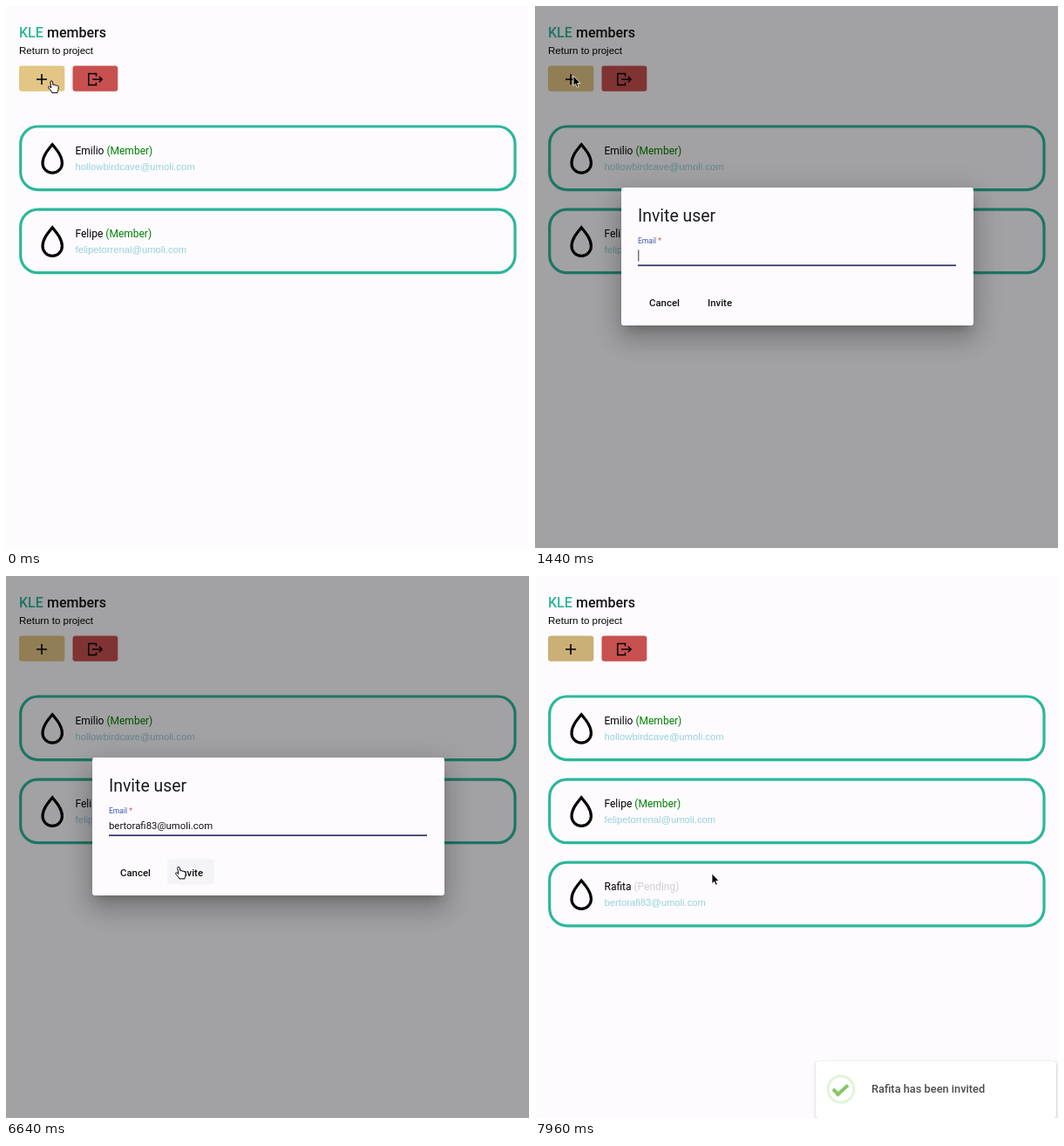
An HTML page for the animation above (8 s loop, 600 px wide and 621 px high).

```html
<!DOCTYPE html>
<html lang="en">
<head>
<meta charset="utf-8">
<title>Members</title>
<style>
  html, body { margin: 0; width: 100%; height: 100%; overflow: hidden; background: #fdfbfe; }
  #stage { position: relative; width: 600px; height: 621px; overflow: hidden; background: #fdfbfe; }
  #stage > * { position: absolute; left: 0; top: 0; }
  svg { display: block; overflow: visible; }
  text { font-family: Roboto, sans-serif; white-space: pre; }
  .mail, .back { font-family: "Liberation Sans", Arial, sans-serif; }
  .mail { font-size: 11.25px; fill: #97d1dd; }
  .line { fill: none; stroke: #000; }
  .action { font-size: 11.4px; font-weight: 500; fill: #111; }
  #shade { width: 600px; height: 621px; background: #000; }
  #stage > #dialog {
    left: 99px; top: 207.5px; width: 403.5px; height: 158.5px; border-radius: 3px; background: #fdfbfe;
    box-shadow: 0 8px 11px -5px rgba(0,0,0,.2), 0 17px 27px 2px rgba(0,0,0,.14), 0 6px 33px 6px rgba(0,0,0,.12);
  }
  #stage > #toast {
    left: 322px; top: 556px; width: 276px; height: 64.5px; border-radius: 3px; background: #fff;
    box-shadow: 0 0 1px rgba(0,0,0,.2), 0 1px 2px rgba(0,0,0,.1), 1px 2px 4px rgba(0,0,0,.075), 1px 3px 8px rgba(0,0,0,.075);
  }
</style>
</head>
<body>
<div id="stage">
  <svg width="600" height="621">
    <text y="35.5" font-size="16" font-weight="500"><tspan x="15" fill="#2db59a">KLE</tspan><tspan x="47" fill="#111">members</tspan></text>
    <text class="back" x="15" y="55" font-size="11.5">Return to project</text>
    <rect id="add" x="15" y="68.5" width="52.3" height="29.2" rx="3"/>
    <path class="line" stroke-width="1.6" d="M35 84h12M41 78v12"/>
    <rect x="76.5" y="68.5" width="51.8" height="29.2" rx="3" fill="#c8504f"/>
    <path class="line" stroke-width="1.5" d="M103.5 80.5v-3h-8.700v13h8.700v-3M99 84h11M106.800 80.700l3.300 3.300l-3.300 3.300"/>
    <g id="cards"></g>
  </svg>
  <div id="shade"></div>
  <div id="dialog">
    <svg width="403.5" height="158.5" viewBox="99 207.5 403.5 158.5">
      <text x="118" y="246" font-size="19.4" fill="#1b1b1f">Invite user</text>
      <text id="label" font-size="11.4">Email <tspan fill="#f44336">*</tspan></text>
      <text id="input" x="118" y="289" font-size="11.35" fill="#111"></text>
      <rect id="caret" y="279" width="1" height="13" fill="#333"/>
      <rect x="118" y="296" width="365" height="1" fill="#858488"/>
      <rect id="ripple" y="296" height="1.6" fill="#30336f"/>
      <rect id="hover" x="185" y="324" width="54" height="29" rx="3" fill="#f4f4f6"/>
      <text class="action" x="131" y="343">Cancel</text>
      <text class="action" x="198" y="343">Invite</text>
    </svg>
  </div>
  <div id="toast">
    <svg width="276" height="64.5" viewBox="322 556 276 64.5">
      <circle cx="351" cy="588" r="15" fill="none" stroke="#e1f4d8" stroke-width="3"/>
      <g fill="none" stroke="#86c867" stroke-width="4">
        <path id="tip" pathLength="1" d="M342 588l7 7"/>
        <path id="long" pathLength="1" d="M346 595.200L359 583.500"/>
      </g>
      <text x="386" y="592" font-size="12.8" font-weight="500" fill="#4b4b4b">Rafita has been invited</text>
    </svg>
  </div>
  <svg width="600" height="621">
    <g id="cursor">
      <path id="arrow" fill="#000" stroke="#fff" stroke-width=".8" d="M0 0V11.500L2.600 9.200L4.400 13.200L6.300 12.400L4.600 8.600L8 8.400Z"/>
      <path id="hand" fill="#fff" stroke="#000" stroke-width="1" stroke-linejoin="round" d="M-1.200 1C-1.200-.6 1.200-.6 1.400 1L2 4.600C2.500 3.600 4 3.800 4.200 5C4.800 4.200 6.200 4.500 6.300 5.600C7 5 8.200 5.400 8.200 6.600L8 9.500C7.800 11 7 11.600 7 13.400H.8C.6 11.800-1.600 10-3.300 7.600C-3.900 6.400-2.400 5.800-1.500 6.700L-.2 8Z"/>
    </g>
  </svg>
</div>
<script>
const LOOP = 8000;
const OPEN = 270, FOCUS = 420, CLOSE = 6680, TOAST = 7160, LISTED = 7240;
const EMAIL = 'bertorafi83@umoli.com';
const KEYS = [1880, 2080, 2320, 2400, 2480, 2680, 2840, 2960, 3160, 3400, 3480,
  3920, 4520, 4680, 4920, 5040, 5240, 5480, 5640, 5800, 5960];
// time, x, y of the pointer
const POINTER = [[0, 52, 86], [40, 52, 86], [480, 44, 80], [6240, 44, 80], [6560, 198, 333.5],
  [6680, 198, 333.5], [7000, 202, 335], [7120, 202, 335], [7880, 203, 341]];
// share of time, vertical shift, angle of the toast wobble
const WOBBLE = [[0, -7, 2], [.33, 0, -2], [.66, 3.5, 2], [1, 0, 0]];
const MEMBERS = [
  ['Emilio', '(Member)', 'green', 'hollowbirdcave@umoli.com'],
  ['Felipe', '(Member)', 'green', 'felipetorrenal@umoli.com'],
  ['Rafita', '(Pending)', '#cfcfd1', EMAIL]
];

const $ = id => document.getElementById(id);
const set = (id, attrs) => Object.entries(attrs).forEach(([k, v]) => $(id).setAttribute(k, v));
const show = (id, on) => { $(id).style.display = on ? '' : 'none'; };
const clamp = p => Math.max(0, Math.min(1, p));
const span = (t, start, length) => clamp((t - start) / length);
const mix = (a, b, p) => a + (b - a) * p;

function bezier(x1, y1, x2, y2) {
  const at = (a, b, s) => 3 * (1 - s) ** 2 * s * a + 3 * (1 - s) * s * s * b + s ** 3;
  return p => {
    let lo = 0, hi = 1;
    for (let i = 0; i < 20; i++) {
      const mid = (lo + hi) / 2;
      if (at(x1, x2, mid) < p) lo = mid; else hi = mid;
    }
    return at(y1, y2, hi);
  };
}
const swift = bezier(.25, .8, .25, 1);
const enter = bezier(0, 0, .2, 1);
const smooth = bezier(.42, 0, .58, 1);

function track(keys, t) {
  const i = keys.findIndex(k => k[0] > t);
  if (i < 0) return keys[keys.length - 1].slice(1);
  const a = keys[i - 1], b = keys[i];
  const p = smooth((t - a[0]) / (b[0] - a[0]));
  return a.slice(1).map((v, n) => mix(v, b[n + 1], p));
}

$('cards').innerHTML = MEMBERS.map(([name, role, color, mail], i) => `
  <g id="card${i}" transform="translate(0 ${i * 95.1})">
    <rect x="16.7" y="138" width="567.3" height="72.6" rx="20" fill="none" stroke="#2db79b" stroke-width="3.2"/>
    <path class="line" stroke-width="3.2" d="M53.200 158.700C48 165 42 172 42 180a11.200 11.200 0 0 0 22.400 0C64.400 172 58.400 165 53.200 158.700Z"/>
    <text x="79.5" y="170.3" font-size="12">${name} <tspan fill="${color}">${role}</tspan></text>
    <text class="mail" x="79.5" y="188">${mail}</text>
  </g>`).join('');

function drawDialog(t) {
  const opening = enter(span(t, OPEN, 150));
  const closing = span(t, CLOSE, 75);
  const visible = t >= OPEN && closing < 1;
  $('shade').style.opacity = .36 * (swift(span(t, OPEN, 400)) - swift(span(t, CLOSE, 400)));
  show('dialog', visible);
  if (!visible) return;
  $('dialog').style.opacity = opening * (1 - closing);
  $('dialog').style.transform = `scale(${mix(.7, 1, opening)})`;

  const float = swift(span(t, FOCUS, 400));
  set('label', {
    transform: `translate(118 ${mix(289, 271.7, float)}) scale(${mix(1, .75, float)})`,
    fill: t < FOCUS ? '#777' : '#3c55b0'
  });
  const width = 365 * mix(.5, 1, swift(span(t, FOCUS, 300)));
  set('ripple', { x: 300.5 - width / 2, width, opacity: span(t, FOCUS, 100) });

  const typed = KEYS.filter(k => k <= t).length;
  const lastKey = typed ? KEYS[typed - 1] : FOCUS;
  $('input').textContent = EMAIL.slice(0, typed);
  set('caret', { x: 118.3 + (typed ? $('input').getComputedTextLength() : 0) });
  show('caret', t >= FOCUS && Math.floor((t - lastKey) / 500) % 2 === 0);
}

function drawToast(t) {
  show('toast', t >= TOAST);
  const [y, angle] = track(WOBBLE, span(t, TOAST, 500));
  $('toast').style.transform = `translateY(${y}px) rotate(${angle}deg)`;
  const p = span(t, TOAST, 750);
  const stroke = (id, start, length) => {
    const drawn = span(p, start, length);
    show(id, drawn > 0);
    set(id, { 'stroke-dasharray': `${drawn} 2` });
  };
  stroke('tip', .54, .16);
  stroke('long', .65, .19);
}

function drawPointer(t) {
  const [x, y] = track(POINTER, t);
  const overInvite = t > 6240 && t < CLOSE + 75 && x > 185 && y > 324;
  const hand = t < OPEN || overInvite;
  set('cursor', { transform: `translate(${x} ${y})` });
  show('cursor', t < KEYS[0] || t >= 6280);
  show('hand', hand);
  show('arrow', !hand);
  show('hover', overInvite);
}

function draw(t) {
  const focus = span(t, 7080, 200);
  const rgb = [227, 197, 133].map(c => Math.round(c * (1 - .11 * focus)));
  set('add', { fill: `rgb(${rgb})` });
  show('card2', t >= LISTED);
  drawDialog(t);
  drawToast(t);
  drawPointer(t);
}

const start = performance.now();
function tick() {
  draw((performance.now() - start) % LOOP);
  requestAnimationFrame(tick);
}
tick();
</script>
</body>
</html>
```
